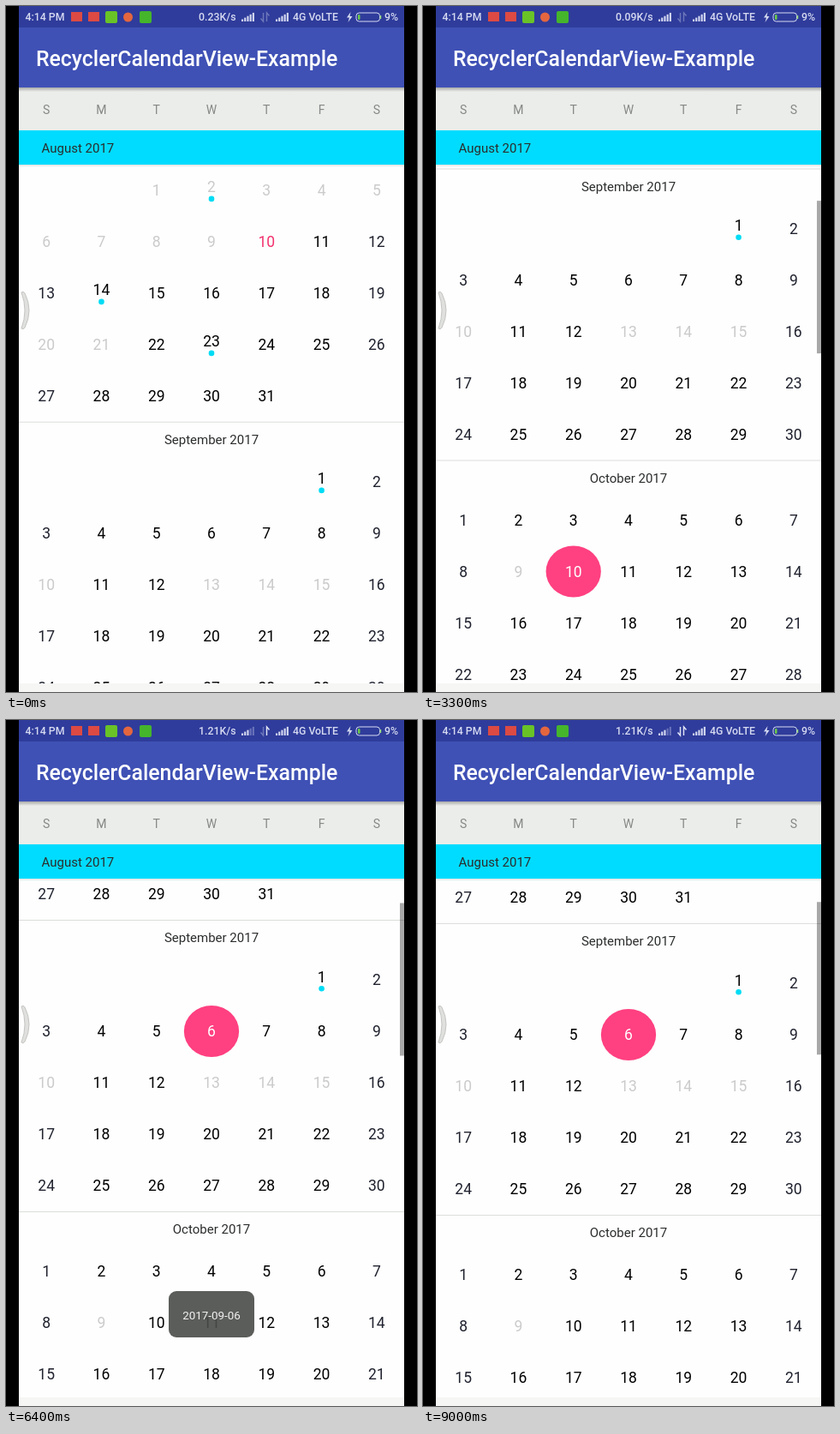
These frames come from a looping animation (480x800 px, 9100 ms). An HTML page:

```html
<!DOCTYPE html>
<html lang="en">
<head>
<meta charset="utf-8">
<title>Calendar</title>
<style>
  html, body { margin: 0; width: 100%; height: 100%; overflow: hidden; background: #000; }
  svg { display: block; width: 480px; height: 800px; font-family: Roboto, "Liberation Sans", sans-serif; }
  .day { font-size: 17.5px; text-anchor: middle; fill: #000; }
  .weekend { fill: #20222f; }
  .off { fill: #cacbca; }
  .today { fill: #f2326f; }
  .picked { fill: #fff; }
  .month { font-size: 15px; fill: #2b2d2c; }
  .mid { text-anchor: middle; }
  .week { font-size: 14px; fill: #868886; text-anchor: middle; }
  .status { font-size: 12.3px; font-weight: 500; fill: #d6daf1; }
  .title { font-size: 24.85px; font-weight: 500; fill: #fff; }
  .toast { font-size: 13.4px; fill: #f2f2f2; text-anchor: middle; }
</style>
</head>
<body>
<svg viewBox="0 0 480 800" xmlns="http://www.w3.org/2000/svg">
  <defs>
    <clipPath id="listClip"><rect x="15" y="145" width="450" height="645"/></clipPath>
    <linearGradient id="shade" x2="0" y2="1">
      <stop offset="0" stop-color="#000" stop-opacity=".28"/>
      <stop offset="1" stop-color="#000" stop-opacity="0"/>
    </linearGradient>
  </defs>
  <rect width="480" height="800" fill="#000"/>
  <rect x="15" width="450" height="800" fill="#f6f7f5"/>

  <g clip-path="url(#listClip)">
    <rect x="15" y="145" width="450" height="645" fill="#fdfefd"/>
    <g id="list"></g>
    <g id="sticky">
      <rect x="15" y="145" width="450" height="40" fill="#00dcff"/>
      <rect x="15" y="185" width="450" height="3" fill="url(#shade)" opacity=".4"/>
      <text id="stickyText" class="month" x="41.5" y="171"></text>
    </g>
    <rect id="bar" x="460" width="5" fill="#000" fill-opacity=".34"/>
  </g>

  <rect x="15" y="95" width="450" height="50" fill="#ebedea"/>
  <rect x="15" y="95" width="450" height="5" fill="url(#shade)"/>
  <g id="week"></g>
  <rect x="15" y="25" width="450" height="70" fill="#3f51b5"/>
  <rect x="15" width="450" height="25" fill="#2f3c9b"/>
  <text class="title" x="35" y="70">RecyclerCalendarView-Example</text>

  <g class="status">
    <text x="22.5" y="17.3">4:14 PM</text>
    <text id="speed" x="268.5" y="17.3" text-anchor="end"></text>
    <text x="335" y="17.3">4G VoLTE</text>
    <text x="442" y="17.3">9%</text>
  </g>
  <rect x="76" y="7" width="13" height="11" fill="#dc4a43"/>
  <rect x="96" y="7" width="13" height="11" fill="#dc4a43"/>
  <rect x="116" y="6" width="14" height="14" rx="2" fill="#69c327"/>
  <circle cx="142.5" cy="13" r="5.5" fill="#e4663f"/>
  <rect x="156" y="6" width="14" height="14" rx="2" fill="#45b52c"/>
  <g id="signals" fill="#d6daf1"></g>
  <g fill="none" stroke="#e4e7f7" stroke-width="1.4">
    <path id="down" d="M300.5 8v10l-3-3.5"/>
    <path id="up" d="M304.5 18v-10l3 3.5"/>
  </g>
  <path d="M402.5 7l-4.5 6.5h3l-1.5 5.5 5-7h-3z" fill="#d6daf1"/>
  <rect x="409" y="8" width="27.5" height="10" rx="3.5" fill="none" stroke="#d6daf1"/>
  <rect x="411" y="10" width="2.5" height="6" rx="1" fill="#6ccb4b"/>
  <path d="M437.5 11v4" stroke="#8fd47a" stroke-width="1.5"/>

  <path d="M18 334Q20 332 22 335Q32 355 22 375Q20 378 18 376Q26 355 18 334z" fill="#e0e1de" stroke="#c3c5c1"/>

  <g id="toast">
    <rect x="190" y="666" width="100" height="54" rx="9" fill="#4b4d4a" fill-opacity=".91"/>
    <text class="toast" x="240" y="699">2017-09-06</text>
  </g>
</svg>
<script>
const LOOP = 9100, STEP = 100, PICK = 4800;
const COL = 450 / 7, ROW = 60, HEAD = 40, LIST_TOP = 145;
const $ = id => document.getElementById(id);

function add(parent, tag, attrs, text) {
  const el = document.createElementNS('http://www.w3.org/2000/svg', tag);
  for (const k in attrs) el.setAttribute(k, attrs[k]);
  if (text !== undefined) el.textContent = text;
  return parent.appendChild(el);
}
const colX = c => 15 + COL * (c + .5);

const months = [
  { name: 'August 2017', first: 2, days: 31, off: [1, 2, 3, 4, 5, 6, 7, 8, 9, 20, 21], dots: [2, 14, 23], today: 10 },
  { name: 'September 2017', first: 5, days: 30, off: [10, 13, 14, 15], dots: [1], pick: 6 },
  { name: 'October 2017', first: 0, days: 31, off: [9], dots: [], pick: 10 }
];

const picks = [];
let monthY = LIST_TOP;
for (const m of months) {
  if (monthY > LIST_TOP) add($('list'), 'rect', { x: 15, y: monthY, width: 450, height: 1, fill: '#dcdedc' });
  add($('list'), 'text', { x: 240, y: monthY + 26, class: 'month mid' }, m.name);
  for (let d = 1; d <= m.days; d++) {
    const cell = m.first + d - 1, c = cell % 7;
    const x = colX(c), y = monthY + HEAD + ROW * (Math.floor(cell / 7) + .5);
    const dot = m.dots.includes(d);
    const kind = m.off.includes(d) ? 'off' : d === m.today ? 'today' : c % 6 ? '' : 'weekend';
    const disc = d === m.pick && add($('list'), 'ellipse', { cx: x, cy: y, rx: COL / 2, ry: 30, fill: '#ff4081' });
    const label = add($('list'), 'text', { x, y: y + (dot ? 2.7 : 6.3), class: 'day ' + kind }, d);
    if (dot) add($('list'), 'circle', { cx: x, cy: y + 10.2, r: 3.3, fill: '#00dcf5' });
    if (disc) picks.push({ disc, label });
  }
  monthY += HEAD + ROW * Math.ceil((m.first + m.days) / 7);
}

[...'SMTWTFS'].forEach((s, i) => add($('week'), 'text', { x: colX(i), y: 125.5, class: 'week' }, s));

const weakBars = [];
for (const x of [275, 315]) {
  for (let i = 0; i < 5; i++) {
    const h = 2.5 + i * 1.9;
    const b = add($('signals'), 'rect', { x: x + i * 3.2, y: 18 - h, width: 2.1, height: h });
    if (x === 275 && i > 2) weakBars.push(b);
  }
}

// Smooth curve through [time, value] points, flat at turning points
function curve(pts) {
  const slope = pts.slice(1).map((p, i) => (p[1] - pts[i][1]) / (p[0] - pts[i][0]));
  const tan = pts.map((_, i) => {
    const a = slope[i - 1] || 0, b = slope[i] || 0;
    return a * b > 0 ? 2 * a * b / (a + b) : 0;
  });
  return t => {
    if (t <= pts[0][0]) return pts[0][1];
    const i = pts.findIndex(p => p[0] >= t) - 1;
    if (i < 0) return pts[pts.length - 1][1];
    const [t0, v0] = pts[i], [t1, v1] = pts[i + 1];
    const w = t1 - t0, u = (t - t0) / w, r = 1 - u;
    return v0 * (1 + 2 * u) * r * r + tan[i] * w * u * r * r
         + v1 * u * u * (3 - 2 * u) - tan[i + 1] * w * u * u * r;
  };
}
const offset = curve([[1500, .3], [2400, 174], [3300, 295.5], [4300, 350.4], [4500, 351.5],
  [5000, 351.5], [6400, 252], [7300, 350], [9000, 248]]);
const ramp = (t, a, b) => Math.min(1, Math.max(0, (t - a) / (b - a)));

function draw(t) {
  const s = offset(t), late = t >= PICK, next = s >= 340;
  $('list').setAttribute('transform', `translate(0 ${-s})`);

  $('sticky').setAttribute('transform', `translate(0 ${next ? 0 : -Math.max(0, s - 300)})`);
  $('stickyText').textContent = months[next ? 1 : 0].name;

  const y = next ? 239 + (s - 350) * .3 : s < 174 ? 145 + s * .253 : 189 + (s - 174) * .314;
  $('bar').setAttribute('y', y);
  $('bar').setAttribute('height', next ? 173 : 178);
  $('bar').setAttribute('opacity', t < 1600 ? 0 : t < 5100 ? 1 - ramp(t, 4700, 4900) : 1);

  picks.forEach((p, i) => {
    const on = late === (i === 0);
    p.disc.setAttribute('opacity', on ? 1 : 0);
    p.label.classList.toggle('picked', on);
  });
  $('toast').setAttribute('opacity', ramp(t, 4700, 4900) * (1 - ramp(t, 6800, 7100)));

  $('speed').textContent = t < 1100 ? '0.23K/s' : late ? '1.21K/s' : '0.09K/s';
  weakBars.forEach(b => b.setAttribute('opacity', late ? .35 : 1));
  const busy = t >= 3600;
  $('down').setAttribute('opacity', busy && (!late || t >= 8100) ? 1 : .35);
  $('up').setAttribute('opacity', busy ? 1 : .35);
}

const began = performance.now();
function tick() {
  const t = (performance.now() - began) % LOOP;
  draw(Math.floor(t / STEP) * STEP);
  requestAnimationFrame(tick);
}
tick();
</script>
</body>
</html>
```
